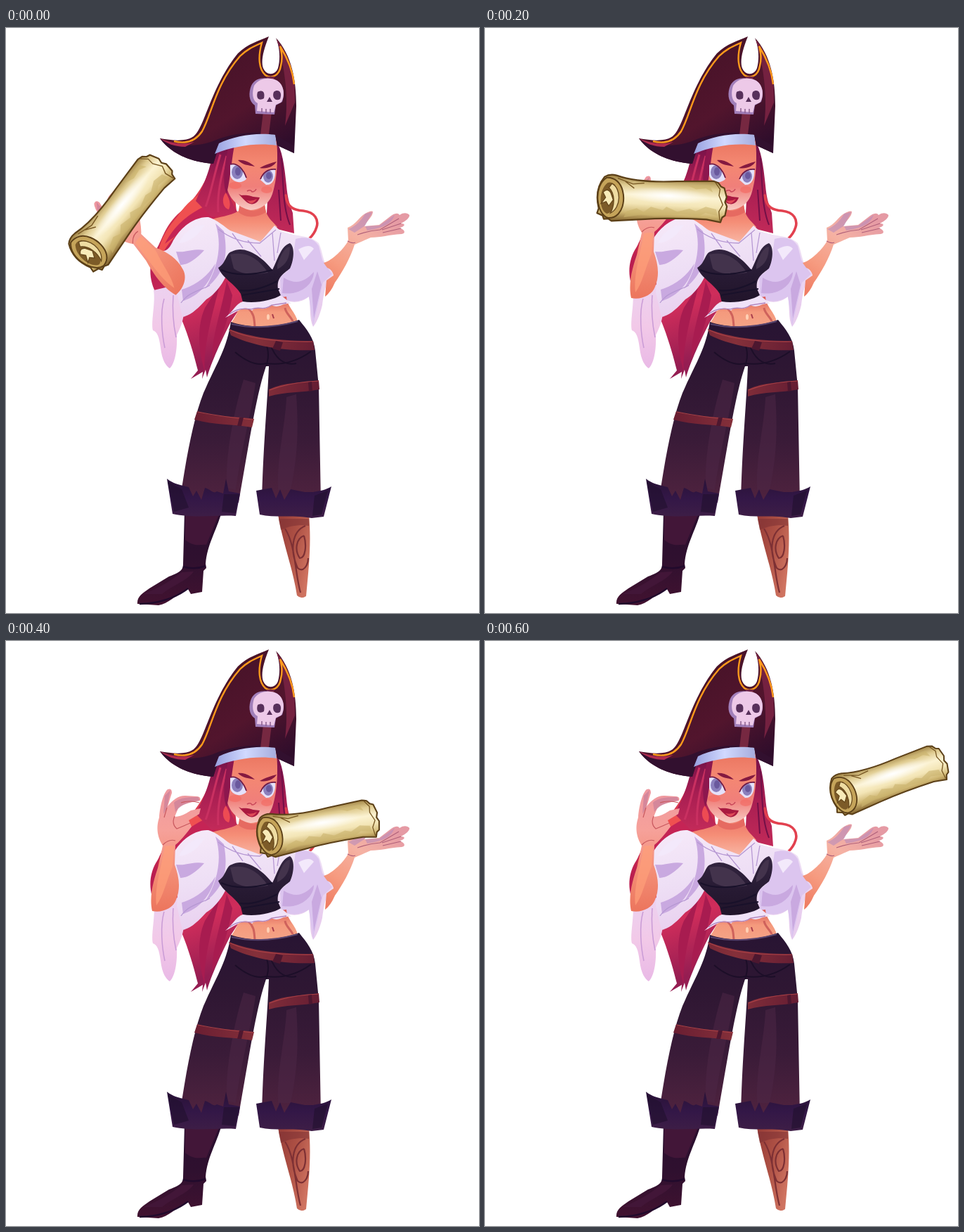
An HTML page for the animation above (700 ms loop, 673 by 832 pixels).

```html
<!DOCTYPE html>
<html lang="en">
<head>
<meta charset="utf-8">
<title>Pirate tossing a scroll</title>
<style>
  html, body { margin: 0; width: 100%; height: 100%; overflow: hidden; background: #fff; }
  svg { display: block; width: 100vw; height: 100vh; }
</style>
</head>
<body>
<svg viewBox="0 0 673 832" preserveAspectRatio="none">
  <defs id="defs"></defs>

  <!-- back hair -->
  <path fill="url(#hair)" d="M300 165C290 215 272 242 244 265C224 285 222 303 213 316C203 334 202 358 215 380L228 386L248 410C260 438 268 467 273 487L263 499L280 489L279 499L284 486L286 497C292 476 306 445 320 418L345 380L330 280L318 165Z"/>
  <path fill="#a81c50" d="M304 365C296 400 280 450 283 489C274 460 271 425 283 398ZM322 380C316 420 304 445 294 470C292 440 306 405 314 360Z"/>
  <path fill="#ef5050" d="M297 232C277 230 256 249 244 268C226 288 213 312 216 338C228 298 257 283 283 266Z"/>
  <path fill="#c52455" d="M291 250C265 260 240 279 226 307C250 287 275 281 298 270Z"/>
  <path fill="url(#sideHair)" d="M384 160C393 173 396 195 399 224C401 246 405 254 408 263L410 292L370 282L372 245Z"/>
  <path fill="none" stroke="#e2414f" stroke-width="3.6" stroke-linecap="round" d="M398 238C400 255 409 259 423 260C440 262 445 273 442 283Q439 293 431 300"/>
  <path fill="url(#sideHair)" d="M297 165C289 212 277 230 270 246L292 268L333 266C311 240 316 216 322 165Z"/>
  <path fill="none" stroke="#c93061" stroke-width="3" d="M305 180C294 216 291 238 284 254M314 182C306 211 300 238 302 262"/>
  <path fill="none" stroke="#721047" stroke-width="2" d="M392 185C395 219 393 252 404 280M388 230L391 274"/>

  <!-- neck and face -->
  <path fill="url(#neck)" d="M333 246L331 260C318 268 303 268 291 273L320 290L361 306L386 283C378 273 369 269 368 250Z"/>
  <path fill="#e66a61" d="M333 250C345 264 359 263 368 251L370 262C356 271 340 270 331 262Z"/>
  <path fill="url(#face)" d="M325 160C318 186 312 215 315 230C319 244 333 257 348 259C362 258 374 251 379 236C384 221 388 194 385 160Z"/>
  <path fill="#ed4b53" d="M313 234C306 242 308 256 317 258C321 249 317 242 313 234Z"/>
  <path fill="#8d174e" d="M326 163C321 183 321 205 314 236C307 222 311 190 318 163Z"/>
  <ellipse cx="326" cy="224" rx="9" ry="5" fill="#f26a63" opacity=".65"/>
  <ellipse cx="371" cy="230" rx="8" ry="5" fill="#f26a63" opacity=".65"/>
  <path fill="#e5e1fb" d="M319 194C329 191 339 202 342 215C335 222 322 220 319 210Z"/>
  <path fill="#e5e1fb" d="M362 216C366 206 374 200 383 201C384 215 379 224 370 223Z"/>
  <ellipse cx="329" cy="205" rx="8" ry="10" fill="#8b80bd"/>
  <ellipse cx="373" cy="211" rx="7" ry="9" fill="#8b80bd"/>
  <ellipse cx="330" cy="204" rx="4" ry="6" fill="#6a599e"/>
  <ellipse cx="374" cy="210" rx="4" ry="5" fill="#6a599e"/>
  <path fill="none" stroke="#6f1a45" stroke-width="1.8" d="M319 194C329 191 338 201 342 213M362 215C366 205 374 200 384 201"/>
  <path fill="#841940" d="M330 188C337 187 346 190 354 197C344 195 337 195 330 188ZM361 199C370 194 377 192 385 190C381 197 371 201 361 199Z"/>
  <path fill="none" stroke="#c9485a" stroke-width="1.6" d="M343 232Q348 229 350 233Q354 233 356 229"/>
  <path fill="#a91940" d="M335 238C344 237 348 239 352 240L361 241C358 250 350 253 343 248Q338 244 331 236Z"/>
  <path fill="#df4a58" d="M342 245Q350 247 357 243Q352 251 347 249Z"/>

  <!-- hat -->
  <path fill="url(#hat)" d="M219 157C237 160 256 162 267 154C283 142 291 84 330 36C345 22 358 19 374 12C365 34 362 51 367 59C371 67 383 68 387 57C391 43 389 25 384 14C407 39 413 75 413 111L410 178L386 167L383 152C345 147 306 158 301 174L295 193C257 190 233 176 219 157Z"/>
  <path fill="#32102f" d="M219 157C244 170 275 169 297 160C332 146 369 147 385 153L410 168L410 178L386 167L383 154C345 149 306 158 301 174L295 193C257 190 233 176 219 157Z"/>
  <path fill="#742140" d="M385 16C407 43 412 74 411 106L397 139C402 103 398 59 385 16Z"/>
  <path fill="#b12c50" d="M219 157C237 165 253 166 268 162L255 169C240 169 228 164 219 157Z"/>
  <path fill="none" stroke="#ff9b1c" stroke-width="2.4" d="M239 161C255 165 269 162 279 147C293 122 298 80 333 40C343 30 353 26 364 21C358 42 360 59 369 67C377 73 389 68 391 54C394 42 392 34 390 26C402 45 408 61 410 80"/>
  <path fill="#762841" d="M371 69L382 69L381 79L371 79ZM366 119L378 119L374 151L362 152Z"/>
  <path fill="url(#band)" d="M303 164C325 153 358 148 383 152L385 167C358 163 326 167 297 179Z"/>
  <path fill="#a17fba" d="M349 82C354 71 366 70 377 72C394 74 398 91 393 105L384 110L382 123L355 122L354 110C345 104 345 92 349 82Z"/>
  <path fill="#edc9e8" d="M353 82C361 70 376 70 386 75C397 82 397 99 391 106L384 109L381 120L357 118L358 107C350 103 350 91 353 82Z"/>
  <path fill="#57305b" d="M358 91C365 87 369 91 367 100C361 104 355 101 358 91ZM381 91C387 86 394 91 390 101C383 105 378 98 381 91ZM375 98L379 105L371 105Z"/>
  <path stroke="#8c608f" stroke-width="1.5" d="M364 114L364 120M370 115L370 121M376 115L376 121"/>

  <!-- blouse -->
  <path fill="url(#tail)" d="M210 373C213 391 206 417 209 430C215 432 218 439 220 455C222 473 228 481 233 484C241 477 244 454 243 437C251 421 253 412 255 391L244 365Z"/>
  <path fill="none" stroke="#c99bd6" stroke-width="1.5" d="M225 385C219 405 222 437 226 455M238 380C236 407 239 426 242 440"/>
  <path fill="url(#cloth)" d="M220 317C229 318 233 313 238 302C251 279 272 268 288 269C301 273 311 283 319 288L362 304L382 281L390 288C412 298 431 293 445 306C451 319 450 329 457 340C464 342 468 349 464 357C454 361 452 380 450 394C446 411 441 420 437 425C431 413 434 397 431 382C419 392 401 393 391 381L370 350L322 327C316 354 302 376 285 386C274 398 263 409 251 411L243 376L245 345Z"/>
  <path fill="#dcc5ef" d="M412 300C430 295 440 302 445 310L450 330L464 350L451 362L437 424L431 382C415 392 401 390 391 381L390 352C408 348 409 321 412 300Z"/>
  <path fill="#c9a9e0" d="M242 318C255 320 266 313 282 316C272 327 260 337 248 337ZM250 372C270 366 287 353 298 335C291 365 272 382 252 388ZM298 278C307 304 304 338 283 371C310 351 317 326 310 289ZM395 355C413 366 425 361 438 347C438 364 419 381 393 377ZM443 346L449 365L438 413L435 371Z"/>
  <path fill="#f3e9fb" d="M246 306C254 289 268 280 283 280C274 294 262 305 246 306ZM416 315C424 310 433 307 438 314L424 330Z"/>
  <path fill="none" stroke="#b698d3" stroke-width="1.3" d="M302 286C321 301 340 306 361 306L384 287M322 292L337 313M344 302L363 325M379 291L382 331M391 291L386 320M249 391C259 376 274 374 290 366"/>

  <!-- waist -->
  <path fill="url(#skin)" d="M333 390L399 382C400 397 413 405 415 418C385 430 346 428 320 420C327 410 331 402 333 390Z"/>
  <path fill="none" stroke="#cf625c" stroke-width="3" d="M345 399C354 407 353 416 354 424M397 398C398 406 406 411 408 417"/>
  <ellipse cx="373" cy="411" rx="2" ry="4" fill="#ffd0b4"/>
  <path stroke="#a93c4b" stroke-width="2" d="M379 407L381 413"/>
  <path fill="url(#corset)" d="M302 341C313 335 313 320 321 318C340 308 364 325 379 344C387 329 391 310 404 306C412 312 409 332 404 342C394 350 385 355 387 371L394 387L338 394L334 378C326 364 308 356 302 341Z"/>
  <path fill="#43334c" d="M319 322C341 317 358 326 373 348C352 352 333 350 324 342ZM386 337C391 323 396 312 404 311C404 326 399 337 386 343Z"/>
  <path fill="none" stroke="#19112a" stroke-width="2" d="M306 344C329 354 358 350 379 344M333 373C352 376 372 367 386 360M336 380L389 371"/>
  <path fill="#f0e2f8" d="M312 412C325 401 326 393 337 389C356 392 380 387 391 380L406 392C394 390 388 400 378 394C365 405 357 394 350 402C339 394 334 401 312 412Z"/>
  <path fill="none" stroke="#ad82bd" stroke-width="1.3" d="M318 407C329 398 338 399 349 400C361 395 366 403 378 394L399 391"/>

  <!-- legs -->
  <path fill="url(#boot)" d="M254 688L307 688C299 716 286 735 284 762L285 768L281 772L279 802L263 805L259 798C243 804 232 819 217 821L187 819C186 809 194 804 204 797L232 780C249 774 252 770 252 762Z"/>
  <path fill="#421638" d="M255 692L303 692L285 735C276 734 269 739 255 728ZM196 805C220 795 235 786 250 774L267 773C257 787 239 791 222 805Z"/>
  <path fill="none" stroke="#210a2c" stroke-width="2.5" d="M252 766Q268 771 284 765M190 819Q231 818 259 797"/>
  <path fill="url(#peg)" d="M387 692L431 692C435 736 430 774 427 808Q420 813 414 807C408 768 394 733 387 692Z"/>
  <path fill="#7d3034" opacity=".55" d="M388 698L431 698L431 708C414 706 402 709 391 714Z"/>
  <path fill="none" stroke="#7d3034" stroke-width="2.2" d="M397 712C412 735 411 775 419 803M426 708C406 716 404 744 415 768C423 775 430 764 430 754M424 722C413 726 410 742 418 754C426 754 428 736 424 722"/>
  <path fill="url(#pants)" d="M320 418C345 427 384 427 417 415C428 429 438 440 440 459L445 510L448 675L364 675C366 591 372 534 374 481L370 481C357 520 350 565 331 675L247 675C256 614 266 557 281 519C299 478 314 457 320 418Z"/>
  <path fill="#4d2745" opacity=".55" d="M338 500C322 552 312 613 314 654L327 657C334 602 350 544 355 505ZM399 525C398 562 385 611 387 657L405 657C416 605 416 566 413 521Z"/>
  <path fill="none" stroke="#1c0e28" stroke-width="2" d="M326 461C345 477 359 480 370 477C399 481 420 470 434 460M370 481C374 469 374 461 370 448M376 450Q388 482 413 477"/>
  <path fill="none" stroke="#57446e" stroke-width="2" d="M321 421Q365 431 415 417"/>
  <path fill="url(#cuff)" d="M229 641C239 649 249 650 260 653L266 666L271 658L278 671L283 654C292 656 294 663 300 659L309 662L313 641L317 659L333 662L327 694C299 692 272 698 237 691ZM356 658L378 654L384 669L390 656L396 671L405 656L425 660L437 660C448 658 455 657 463 652L452 695L435 697C404 692 383 697 361 692Z"/>
  <path fill="#21102d" opacity=".6" d="M230 645L250 656L260 682L239 688ZM439 665L458 658L449 692L436 694ZM310 663L332 663L326 690L307 688Z"/>
  <path fill="url(#strap)" d="M317 428C342 437 373 445 437 445L439 458C393 460 348 451 320 437ZM272 545C296 554 328 552 353 556L350 568C323 563 297 565 268 557ZM374 514C397 503 423 505 445 501L446 514C421 519 397 517 374 524Z"/>
  <path fill="none" stroke="#a94045" stroke-width="1.2" d="M318 429Q354 447 436 446M273 546Q307 553 352 557M375 515Q402 504 445 502"/>
  <path fill="#4d172f" d="M384 445L394 447L390 459L379 456ZM332 554L338 554L335 566L329 566ZM430 504L435 503L436 516L431 517Z"/>

  <!-- open hand -->
  <path fill="url(#palm)" d="M452 334C464 331 482 313 487 302L486 284C499 279 503 268 511 264Q519 259 522 261C522 269 512 275 510 282L531 280L548 267Q557 261 560 266C566 262 571 263 574 266Q575 271 562 278C569 278 568 282 560 284C568 287 569 292 563 293C544 294 534 298 519 298L496 308C490 327 478 348 468 362Q462 376 454 382L456 359L466 352C465 345 460 342 457 341Z"/>
  <path fill="#b98abb" opacity=".6" d="M487 286C499 281 506 273 511 264L521 262L511 281L496 291ZM511 282L531 281L553 266C548 278 540 284 514 288Z"/>
  <path fill="none" stroke="#b0607a" stroke-width="1.1" d="M500 294Q517 288 532 287L559 271M535 287L562 278M536 291L562 285M486 303Q493 307 497 305"/>

  <!-- throwing arm -->
  <g id="arm">
    <path fill="url(#forearm)" d="M208 384C203 362 211 337 217 320L223 291C214 277 214 263 218 251C219 235 224 216 230 211Q236 209 236 216L230 235C238 225 247 219 256 220L272 221Q278 222 276 227C266 229 251 231 245 238L240 250C250 250 258 244 263 241L277 238L275 246L260 255L264 264C257 273 250 283 241 290L240 318C246 335 249 351 242 368C238 380 222 387 208 384Z"/>
    <path fill="#b17098" opacity=".45" d="M226 220L234 212L229 238L224 246ZM239 230Q247 221 274 222L275 227Q252 229 241 243Z"/>
    <path fill="#ffa079" opacity=".7" d="M226 292Q237 290 239 292L237 321C228 341 224 363 214 376C211 351 221 322 226 292Z"/>
    <path fill="none" stroke="#c95a60" stroke-width="1.2" d="M223 290Q232 281 241 284M229 237L225 251M240 249Q235 260 243 267L262 259M249 230Q262 226 275 230"/>
  </g>

  <g id="scroll">
    <path fill="url(#paper)" stroke="#5c4018" stroke-width="2.2" stroke-linejoin="round" d="M-83 -29Q-76 -34 -66 -32C-42 -25 -11 -25 20 -28L72 -31L79 -29L83 -24L88 -22L92 -9L90 -2L93 4L91 17L87 20L85 27L65 24C34 24 5 25 -22 28L-70 33L-75 30L-81 31L-83 26L-91 23L-89 16Q-97 -10 -83 -29Z"/>
    <ellipse cx="8" cy="-7" rx="62" ry="12" fill="url(#shine)"/>
    <path fill="#cbb56e" opacity=".6" d="M-49 18L-35 13L-25 18L-15 10L2 14L7 9L23 15L40 10L49 13L63 6L78 9L80 18L63 15L54 20L28 18L-9 23L-29 22L-53 27ZM36 -23L48 -18L62 -20L72 -15L67 -25Z"/>
    <path fill="none" stroke="#775723" stroke-width="1.4" d="M-64 -28L-42 -21L-26 -23M-53 -24L-40 -15M75 -29L82 -20L81 -11L87 2L82 12L84 25"/>
    <path fill="#c5a45a" stroke="#5c4018" stroke-width="2" d="M-80 -28C-99 -15 -92 25 -75 29C-50 29 -49 -12 -65 -24Q-72 -29 -80 -28Z"/>
    <path fill="#7c5b28" d="M-78 -21C-92 -9 -88 20 -77 23C-62 20 -60 -10 -68 -19Q-73 -23 -78 -21Z"/>
    <path fill="#eedca2" stroke="#65471c" stroke-width="1.3" d="M-72 -20C-58 -14 -57 14 -72 22C-66 10 -67 -6 -76 -14Z"/>
    <path fill="#f8ebb9" stroke="#65471c" stroke-width="1.3" d="M-84 -7Q-78 -14 -73 -7L-69 3L-75 12L-79 6L-86 9L-80 0Z"/>
  </g>
</svg>

<script>
  const byId = id => document.getElementById(id);

  // Each gradient: direction x2, y2, then evenly spaced colours.
  const gradients = {
    hair: [0.15, 1, "#951a51 #df3f50 #b91d50 #cf2d5b #951d52"],
    sideHair: [0, 1, "#711148 #a81e52 #c22a59"],
    neck: [0, 1, "#ea6c63 #f58e77 #f8b7a5"],
    face: [0, 1, "#ea7560 #f48872 #f07f7a #f8cbc4"],
    hat: [0.7, 1, "#6a2037 #481329 #52152d #2f0d2b"],
    band: [1, 0, "#98a0df #d1d9ff #a5acdd"],
    cloth: [0.3, 1, "#f7eaf9 #eedff5 #e8cdee"],
    tail: [0, 1, "#ecd2f0 #f2c9e8 #e9b9e6"],
    skin: [0, 1, "#d95b58 #f59a7d #f4a487"],
    corset: [0, 1, "#342641 #281b34 #201329"],
    boot: [0, 1, "#2a0f2f #2f102f #421230"],
    peg: [1, 0.6, "#963c38 #ad5044 #cf7360"],
    pants: [0, 1, "#281433 #2f1733 #3a1b38 #50233f"],
    cuff: [0, 1, "#291237 #331747 #3e1e46"],
    strap: [1, 0, "#6a1e32 #85303a #651d33"],
    palm: [0.7, -1, "#ed775e #f69b80 #f5b2a4 #e59aa4"],
    forearm: [0, 1, "#ee98a0 #f6a19a #f38e76 #ec755d"],
    paper: [0, 1, "#9b7d3d #dfcb90 #fcf3d2 #f3e5b6 #cfb672 #7f602c"]
  };

  const stops = list => list.map((color, i) =>
    `<stop offset="${i / (list.length - 1)}" stop-color="${color}"/>`).join("");

  byId("defs").innerHTML = Object.entries(gradients).map(([id, [x, y, colors]]) =>
    `<linearGradient id="${id}" x1="0" y1="${y < 0 ? 1 : 0}" x2="${x}" y2="${Math.max(0, y)}">${stops(colors.split(" "))}</linearGradient>`
  ).join("") + `<radialGradient id="shine"><stop stop-color="#fff"/><stop offset="1" stop-color="#fff" stop-opacity="0"/></radialGradient>`;

  // Held poses: arm angle, then scroll centre, angle and scale.
  const poses = [
    { arm: -49, x: 165, y: 262, turn: -50, scale: 1 },
    { arm: -20, x: 217, y: 244, turn: -23, scale: 1 },
    { arm: 0, x: 251.5, y: 245, turn: 3, scale: 1 },
    { arm: 0, x: 351, y: 263, turn: 0, scale: 1 },
    { arm: 0, x: 443.5, y: 266, turn: -9, scale: 0.945 },
    { arm: 0, x: 526, y: 227, turn: -18, scale: 0.925 },
    { arm: 0, x: 574.5, y: 197.5, turn: -18, scale: 0.925 }
  ];
  const hold = 100;
  const arm = byId("arm"), scroll = byId("scroll");

  function draw(time) {
    const { arm: angle, x, y, turn, scale } = poses[Math.floor(time / hold) % poses.length];
    arm.setAttribute("transform", `rotate(${angle} 220 345)`);
    scroll.setAttribute("transform", `translate(${x} ${y}) rotate(${turn}) scale(${scale})`);
  }

  const start = performance.now();
  function tick() {
    draw(performance.now() - start);
    requestAnimationFrame(tick);
  }
  tick();
</script>
</body>
</html>
```
